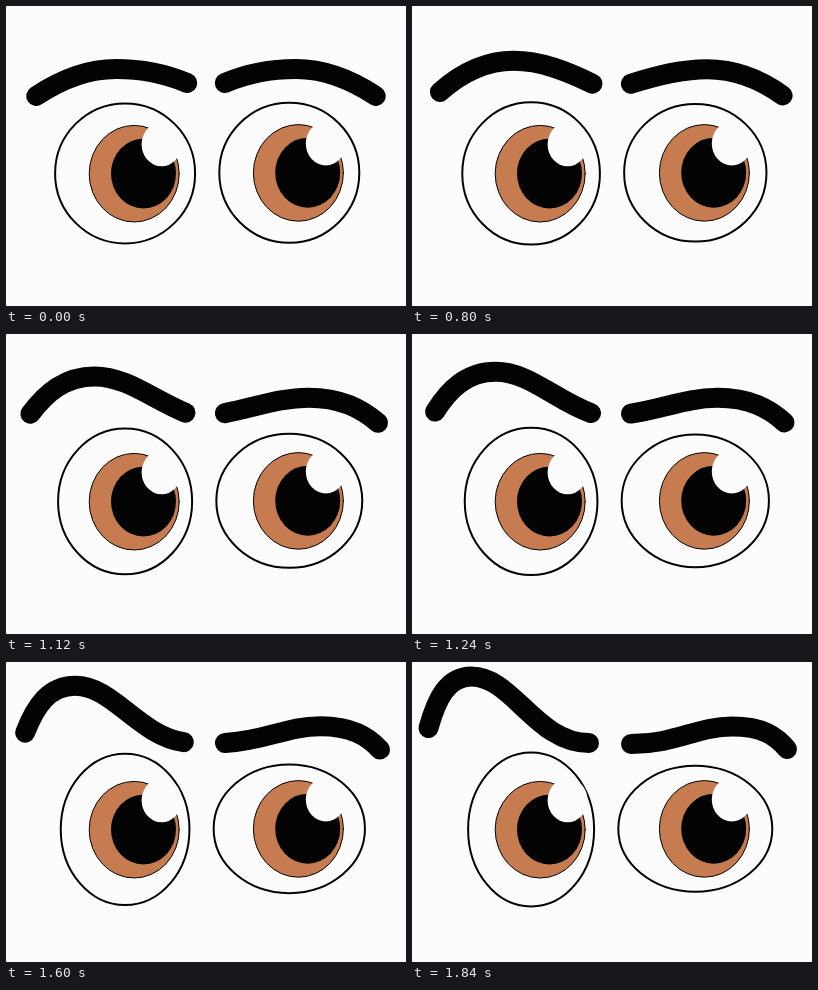
These frames come from a looping animation (400 px wide and 300 px high, 3000 ms). An HTML page:

```html
<!DOCTYPE html>
<html lang="en">
<head>
<meta charset="utf-8">
<title>Raised eyebrow</title>
<style>
  html, body { margin: 0; width: 100%; height: 100%; overflow: hidden; background: #fcfcfc; }
  svg { display: block; width: 100%; height: 100%; fill: #030303; stroke-linecap: round; }
  .outline { fill: none; stroke: #030303; stroke-width: 2; }
  .brow { stroke-width: 20; }
</style>
</head>
<body>
<svg viewBox="0 0 400 300">
  <defs>
    <g id="iris">
      <ellipse cx="128.2" cy="167.7" rx="45" ry="48.3" fill="#c67c50" stroke="#030303"/>
      <ellipse cx="137.5" cy="167.5" rx="32.5" ry="35"/>
      <ellipse cx="155.6" cy="138.3" rx="20" ry="22" fill="#fcfcfc"/>
    </g>
  </defs>
  <ellipse id="leftEye" class="outline" cx="119.1" cy="167.4"/>
  <ellipse id="rightEye" class="outline" cx="283.3" cy="166.8"/>
  <use href="#iris"/>
  <use href="#iris" x="164.2" y="-0.8"/>
  <path id="leftBrow" class="outline brow"/>
  <path id="rightBrow" class="outline brow"/>
</svg>
<script>
const LOOP = 3000, STEP = 40, START = 590, DURATION = 1250;

const byId = id => document.getElementById(id);
const mix = (a, b, p) => a + (b - a) * p;
const mixPoint = (a, b, p) => a.map((v, i) => mix(v, b[i], p));
const mirror = ([x, y]) => [400 - x, y];

// Key points of a brow, at rest and raised; at rest both brows mirror each other.
const leftRest = { outer: [30.2, 90], crest: [110, 63], inner: [181.2, 77] };
const rightRest = Object.fromEntries(
  Object.entries(leftRest).map(([name, point]) => [name, mirror(point)]));
const leftRaised = { outer: [16.5, 66], crest: [59.5, 14.5], inner: [177, 81] };
const rightRaised = { outer: [375, 87], crest: [320, 64.5], inner: [219, 82] };

// The crest stays level; the outer end steepens while the inner end flattens.
function drawBrow(id, rest, raised, p) {
  const point = name => mixPoint(rest[name], raised[name], p);
  const outer = point('outer'), crest = point('crest'), inner = point('inner');
  const handle = (from, to, x, y) => [mix(from[0], to[0], x), mix(from[1], to[1], y)];
  const path = [
    handle(outer, crest, mix(0.29, 0.19, p), 0.57),
    handle(crest, outer, mix(0.38, 0.56, p), 0),
    crest,
    handle(crest, inner, 0.35, 0),
    handle(inner, crest, mix(0.3, 0.45, p), mix(0.65, 0, p)),
    inner,
  ];
  byId(id).setAttribute('d', `M${outer}C${path.join(' ')}`);
}

function drawEye(id, stretch) {
  byId(id).setAttribute('rx', 70 - stretch);
  byId(id).setAttribute('ry', 70 + stretch);
}

function draw(time) {
  const stepped = Math.floor((time % LOOP) / STEP) * STEP;
  const p = Math.min(1, Math.max(0, (stepped - START) / DURATION));
  drawBrow('leftBrow', leftRest, leftRaised, p);
  drawBrow('rightBrow', rightRest, rightRaised, p);
  drawEye('leftEye', 7 * p);
  drawEye('rightEye', -7 * p);
}

function tick(now) {
  draw(now);
  requestAnimationFrame(tick);
}
draw(0);
requestAnimationFrame(tick);
</script>
</body>
</html>
```
